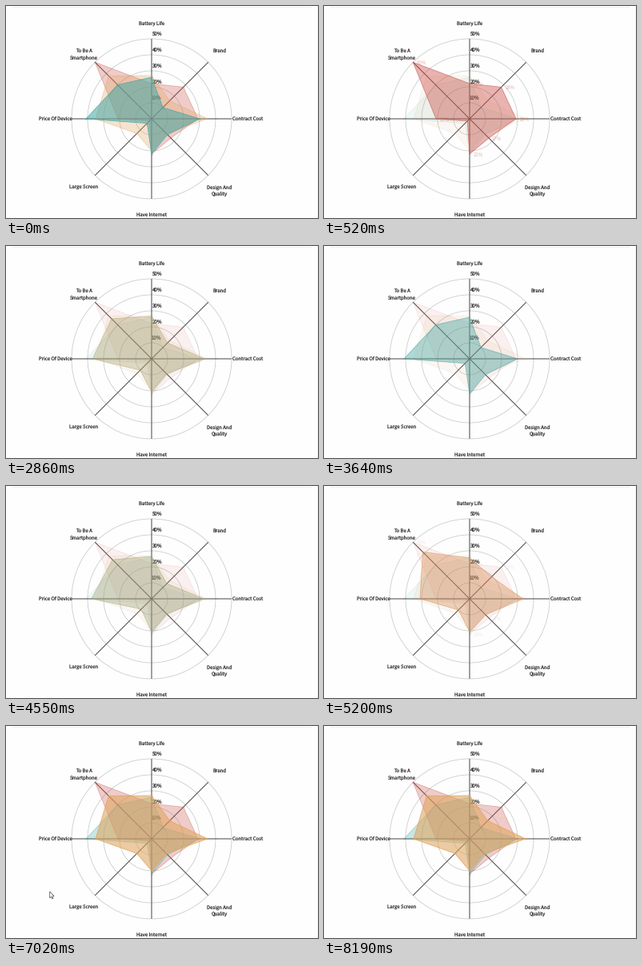
Recreate the animation shown at these times as a matplotlib script. Size 390x265 px, loop 8320 ms.

```python
import numpy as np
import matplotlib.pyplot as plt
from matplotlib.animation import FuncAnimation
from matplotlib.patches import Circle, Polygon

W, H, DPI = 390, 265, 100
FRAMES, INTERVAL = 64, 130
PX = 72 / DPI
CENTER = np.array([182.0, 141.0])
RADIUS, MAX_VALUE = 100, 50
CAPTION_RADIUS, LINE_HEIGHT = 120, 8.2
FONT = "Noto Sans CJK JP"

# Axes run clockwise from the top.
CAPTIONS = ["Battery Life", "Brand", "Contract Cost", "Design And\nQuality",
            "Have Internet", "Large Screen", "Price Of Device",
            "To Be A\nSmartphone"]
RED, TAN, TEAL = range(3)
VALUES = np.array([
    [22, 28, 29, 17, 22, 2, 21, 50],
    [27, 16, 35, 13, 20, 13, 35, 38],
    [26, 10, 30, 14, 22, 4, 41, 30],
])
COLORS = np.array([[204, 82, 74], [224, 164, 92], [75, 168, 166]]) / 255

# The focus area starts on red and moves to each series in turn.
STOPS = [(8, TAN), (18, TEAL), (31, TAN), (38, RED), (45, TAN)]
MOVE_STEPS = 7
GHOST, NORMAL, LEADING, FOCUS = .08, .29, .57, .38

ANGLES = np.arange(8) * np.pi / 4
DIRECTIONS = np.column_stack([np.sin(ANGLES), -np.cos(ANGLES)])

plt.rcParams["text.hinting"] = "none"
plt.rcParams["text.hinting_factor"] = 1


def ramp(frame, start, end):
    return min(max((frame - start) / (end - start), 0), 1)


def to_points(values):
    return CENTER + DIRECTIONS * (values / MAX_VALUE * RADIUS)[:, None]


def mix(table, position):
    low = min(int(position), len(table) - 2)
    return table[low] + (table[low + 1] - table[low]) * (position - low)


def focus_position(frame):
    """Accelerate on the way up the series, move steadily on the way down."""
    position = RED
    for start, stop in STOPS:
        t = ramp(frame, start, start + MOVE_STEPS)
        position += (stop - position) * (t ** 2 if stop > position else t)
    return position


def write(x, y, text, ha="center", size=6, color="#383838", **style):
    return ax.text(x, y, text, ha=ha, va="center_baseline", family=FONT,
                   fontsize=size * PX, color=color, **style)


def add_polygon(points, zorder):
    return ax.add_patch(Polygon(points, closed=True, lw=.8 * PX, zorder=zorder))


def paint(patch, color, alpha):
    patch.set_facecolor((*color, alpha))
    patch.set_edgecolor((*color, min(1, alpha * 1.5)))


fig = plt.figure(figsize=(W / DPI, H / DPI), dpi=DPI, facecolor="#fefefe")
ax = fig.add_axes([0, 0, 1, 1])
ax.set(xlim=(0, W), ylim=(H, 0))
ax.axis("off")

ax.plot([8, 381], [.8, .8], color="#edf1f0", lw=PX)
ax.plot([389.3, 389.3], [0, H], color="#f0f0f0", lw=PX)

for level in range(1, 6):
    radius = RADIUS * level / 5
    ax.add_patch(Circle(CENTER, radius, fill=False, ec="#c6cdc9",
                        lw=.8 * PX, zorder=1))
    write(182, CENTER[1] - radius - 6, f"{level * 10}%", ha="left", size=6.2,
          zorder=2)

for direction, caption in zip(DIRECTIONS, CAPTIONS):
    ax.plot(*zip(CENTER, CENTER + direction * RADIUS), color="#4c4444",
            lw=PX, snap=False, solid_capstyle="butt", zorder=2)
    x, y = CENTER + direction * CAPTION_RADIUS
    for row, line in enumerate(caption.split("\n")):
        write(x, y - .3 + row * LINE_HEIGHT, line)

areas, dots = [], []
for values, color in zip(VALUES, COLORS):
    points = to_points(values)
    areas.append(add_polygon(points, 3))
    dots.append(ax.plot(*points.T, "o", ms=2.4 * PX, mew=0, color=color)[0])

focus = add_polygon(to_points(VALUES[RED]), 7)
labels = [write(x + 4, y, f"{value}%", ha="left", color=COLORS[RED], zorder=9)
          for (x, y), value in zip(to_points(VALUES[RED]), VALUES[RED])
          if value > 5]

ARROW = np.array([[0, 0], [0, 8], [1.8, 6.4], [3, 9], [4.2, 8.4],
                  [3.1, 5.9], [5.4, 5.7]])
cursor = ax.add_patch(Polygon(ARROW, closed=True, fc="white", ec="#444444",
                              lw=.7 * PX, zorder=10))


def draw(frame):
    overview = 1 - ramp(frame, 0, 4) + ramp(frame, 52, 54)
    leader = TEAL if frame < FRAMES / 2 else TAN
    for i, (area, dot) in enumerate(zip(areas, dots)):
        shown = LEADING if i == leader else NORMAL
        alpha = GHOST + (shown - GHOST) * overview
        z = 5 if i == leader else 3 + i / 3
        paint(area, COLORS[i], alpha)
        area.set_zorder(z)
        dot.set_zorder(z + .1)
        dot.set_alpha(alpha)

    position = focus_position(frame)
    focus.set_xy(to_points(mix(VALUES, position)))
    paint(focus, mix(COLORS, position), FOCUS * (1 - overview))
    for label in labels:
        label.set_alpha(.28 * (1 - overview) * max(0, 1 - position))

    cursor.set_visible(53 <= frame <= 55)
    drift = 2 * (frame - 54)
    cursor.set_xy(ARROW + (54.7 - drift, 207 + drift))


anim = FuncAnimation(fig, draw, frames=FRAMES, interval=INTERVAL,
                     init_func=lambda: draw(0), repeat=True, repeat_delay=0)
plt.show()
```
